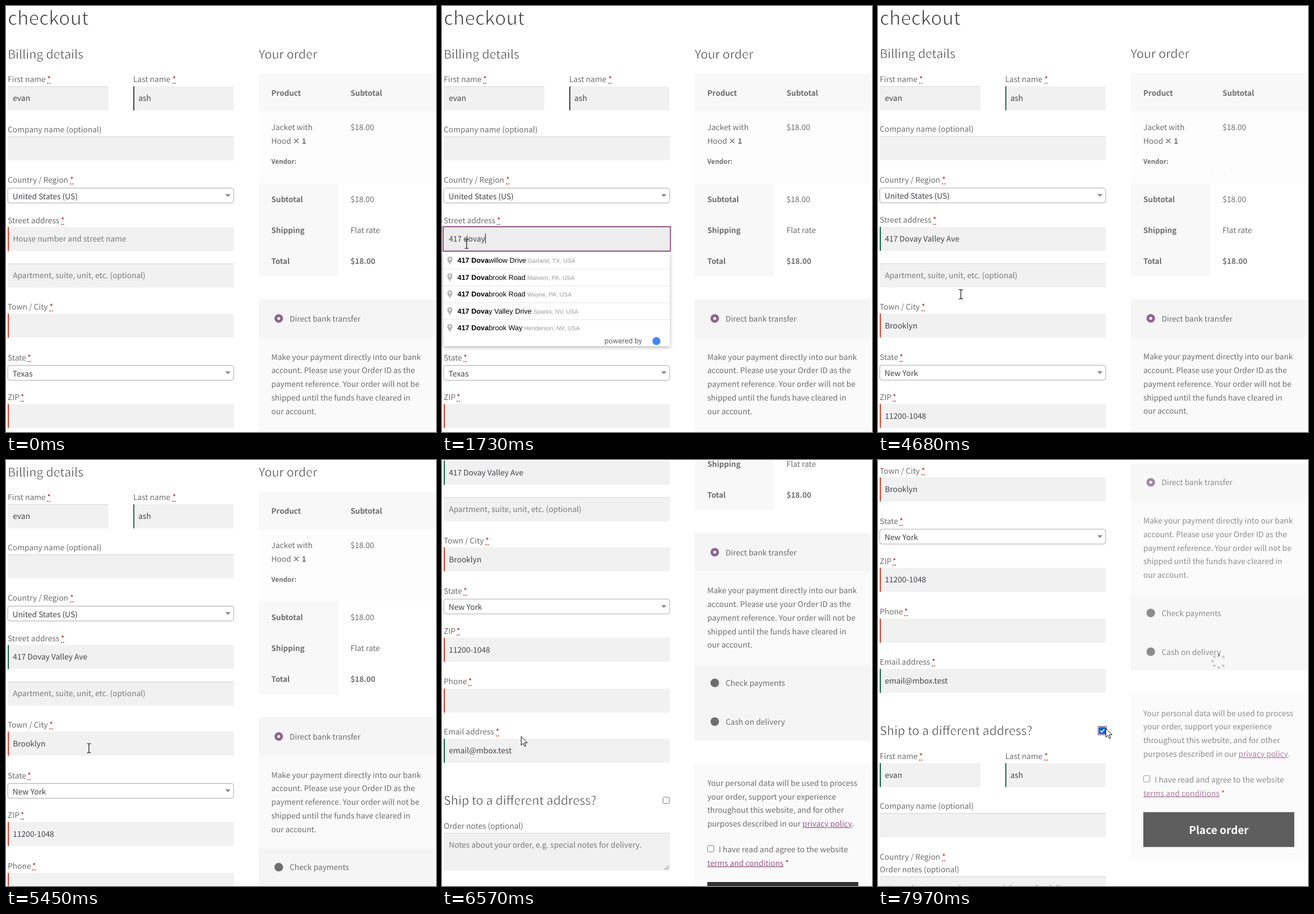
An HTML page for the animation above (8000 ms loop, 752 by 745 pixels).

```html
<!DOCTYPE html>
<html lang="en">
<head>
<meta charset="utf-8">
<title>Checkout</title>
<style>
  html, body { margin: 0; width: 100%; height: 100%; overflow: hidden; background: #fff; }
  svg { display: block; width: 100vw; height: 100vh; }
  text {
    font: 13.5px "Noto Sans CJK JP", "Noto Sans CJK SC", "Noto Sans CJK KR", "Noto Sans CJK TC", "Noto Sans CJK", sans-serif;
    fill: #6d6d6d; white-space: pre; text-rendering: geometricPrecision;
  }
  .bold { font-weight: 600; font-size: 13.2px; }
  .small { font-weight: 600; font-size: 11.4px; }
  .value { fill: #43454b; }
  .hint { fill: #7a7a7a; }
  .req { fill: #b3261e; }
  .link { fill: #96588a; text-decoration: underline; }
  .button { font-weight: 600; font-size: 18.7px; fill: #fff; text-anchor: middle; }
  .h1, .h2 { font-weight: 300; fill: #333; }
  .h1 { font-size: 34.1px; }
  .h2 { font-size: 21.9px; }
  /* Without a light face, thin the regular one. */
  .thin .h1, .thin .h2 { stroke: #fff; stroke-width: .033em; }
  .thin .h1 { font-size: 32.9px; }
  .thin .h2 { font-size: 21.1px; }
  .row { font: 12.45px "Liberation Sans", Arial, sans-serif; fill: #000; }
  .match { font-weight: 700; }
  .place { font-size: 10.4px; fill: #999; }
  .powered { font: 12.9px Roboto, sans-serif; fill: #666; }
  #list { filter: drop-shadow(0 2px 3px rgba(0,0,0,.3)); }
</style>
</head>
<body>
<svg id="stage" viewBox="0 0 752 745"></svg>
<script>
const LOOP = 8000, CLICK = 3640, CHECK = 7822, FOCUS = 140;
const RED = '#d0432c', GREEN = '#17654b', DARK = '#3a3a3a';
const QUERY = '417 dovay';
const KEYS = [350, 420, 560, 700, 910, 1050, 1190, 1400, 1610];

// Each suggestion: matched part | rest | place
const LISTS = [
  [700, ['417| Alderfen Street|Dayton, OH, USA', '417| North Pellam Road|Salem, OR, USA', '417| Brunmere Court|Tulsa, OK, USA',
         '417| West Hollin Avenue|Boise, ID, USA', '417| Kestmoor Lane|Macon, GA, USA']],
  [1120, ['417 Do|lmarrow Crossing Boulevard|Huntsville, AL, USA', '417 Do|rnfield Drive|Plano, TX, USA', '417 Do|velin Street|Akron, OH, USA',
          '417 Do|rrimore Avenue|Fresno, CA, USA', '417 Do|stwick Lane|Dover, DE, USA']],
  [1730, ['417 Dova|willow Drive|Garland, TX, USA', '417 Dova|brook Road|Malvern, PA, USA', '417 Dova|brook Road|Wayne, PA, USA',
          '417 Dova|y Valley Drive|Sparks, NV, USA', '417 Dova|brook Way|Henderson, NV, USA']],
  [2240, ['417 Dovay| Valley Drive|Sparks, NV, USA', '417 Dovay| Street|San Antonio, TX, USA', '417 Dovay| Street West|Perham, MN, USA',
          '417 Dovay| Drive|Reeds Spring, MO, USA', '417 Dovay| Valley Avenue|Brooklyn, NY, USA']],
];
const SCROLL = [[4680, 0], [4960, 63], [5600, 63], [6150, 243], [6570, 385], [6990, 507.5]];
const MOUSE_X = [[2600, 43], [3430, 127], [3900, 127], [4700, 145], [5550, 145], [5850, 138], [7000, 138], [7600, 398]];
const MOUSE_Y = [[2600, 416], [3430, 558], [3900, 558], [4700, 504], [5550, 504], [5850, 483], [7000, 483], [7600, 469]];

const rect = (x, y, w, h, fill, more = '') =>
  `<rect x="${x}" y="${y}" width="${w}" height="${h}" fill="${fill}" ${more}/>`;
const text = (x, y, s, cls = '', id = '') => `<text x="${x}" y="${y}" class="${cls}" id="${id}">${s}</text>`;
const lines = (x, y, rows) => rows.map((s, i) => text(x, y + 23.8 * i, s)).join('');

function label(x, y, s, starX) {
  const star = starX ? text(starX, y, '*', 'req') +
    `<path d="M${starX} ${y + 2.3}h6" stroke="#b3261e" stroke-width="1.4" stroke-dasharray="2 1.6"/>` : '';
  return text(x, y, s) + star;
}

function field({ y, x = 3, w = 395.5, h = 42, mark, id = '', value = '', cls = 'value' }) {
  const edge = mark ? rect(x, y, 2, h, mark, `id="${id}Mark"`) : rect(x, y, w, 1, '#d6d6d6');
  return rect(x, y, w, h, '#f1f1f1') + edge + text(x + 9, y + 25.8, value, cls, id);
}

const select = (y, value, id = '') =>
  rect(3, y, 395, 26, '#fff', 'stroke="#aaa" rx="4"') + text(11.5, y + 19, value, 'value', id) +
  `<path d="M383.5 ${y + 10.5}h9l-4.5 5z" fill="#888"/>`;

const nameBlock = (first, last, id) =>
  label(3, 133, 'First name', 72) + field({ y: 140.5, w: 176, mark: first, value: 'evan' }) +
  label(222.5, 133, 'Last name', 291) + field({ y: 140.5, x: 222.5, w: 175.5, mark: last, id, value: 'ash' }) +
  label(3, 220.7, 'Company name (optional)') + field({ y: 228 }) +
  label(3, 309, 'Country / Region', 112) + select(318.5, 'United States (US)');

const billing = () =>
  text(3, 33, 'checkout', 'h1') + text(3, 91.5, 'Billing details', 'h2') +
  nameBlock('', DARK, 'last') +
  label(3, 379.7, 'Street address', 96) + field({ y: 386.5, mark: RED, id: 'street' }) +
  field({ y: 450.5, value: 'Apartment, suite, unit, etc. (optional)', cls: 'hint' }) +
  label(3, 531, 'Town / City', 76) + field({ y: 538, mark: RED, id: 'town' }) +
  label(3, 619.5, 'State', 37.5) + select(628.5, '', 'state') +
  label(3, 689, 'ZIP', 25.5) + field({ y: 696, mark: RED, id: 'zip' }) +
  label(3, 777.5, 'Phone', 46) + field({ y: 785, mark: RED }) +
  label(3, 865.5, 'Email address', 94) + field({ y: 872.7, mark: GREEN, value: 'email@mbox.test' }) +
  text(3, 988, 'Ship to a different address?', 'h2');

const checkbox = (x, y) => rect(x, y, 11, 11, '#fff', 'stroke="#767676" rx="2"');

const shipping = () => checkbox(386.5, 975) +
  `<g id="checked">${rect(385, 973.5, 14.5, 14.5, '#fff', 'stroke="#8a6a94" stroke-width="1.4"')}
    ${rect(386.3, 974.8, 12, 12, '#0b5fd0', 'rx="1.5"')}
    <path d="M389 981l2.5 2.5 4.5-5.5" fill="none" stroke="#fff" stroke-width="1.8"/></g>
  <clipPath id="clip"><rect id="clipBox" x="0" y="1013" width="420" height="0"/></clipPath>
  <g clip-path="url(#clip)"><g transform="translate(0 897)">${nameBlock(GREEN, GREEN, '')}</g></g>
  <g id="notes">${label(3, 1030, 'Order notes (optional)')}
    ${field({ y: 1037.5, h: 66, value: 'Notes about your order, e.g. special notes for delivery.', cls: 'hint' })}
    <path d="M389 1102l8-8M393 1102l4-4" stroke="#666"/></g>`;

const summaryRow = (y, name, value, cls) => text(464, y, name, 'bold') + text(602.5, y, value, cls);
const radio = (y, name, on) =>
  `<circle cx="477" cy="${y}" r="7.5" fill="${on ? '#8d6590' : '#6d6d6d'}"/>` +
  (on ? `<circle cx="477" cy="${y}" r="2.5" fill="#fff"/>` : '') + text(496, y + 5.3, name);

const order = () =>
  text(442, 91.5, 'Your order', 'h2') +
  rect(442, 118, 308, 66.5, '#f8f8f8') + rect(442, 184.5, 308, 126, '#fdfdfd') + rect(442, 310.5, 139, 162.5, '#f8f8f8') +
  summaryRow(157, 'Product', 'Subtotal', 'bold') +
  text(464, 217, 'Jacket with') + text(464, 241, 'Hood') + text(501, 241, '× 1', 'bold') +
  text(464, 276, 'Vendor:', 'small') + text(602.5, 217, '$18.00') +
  summaryRow(343, 'Subtotal', '$18.00') + summaryRow(397, 'Shipping', 'Flat rate') + summaryRow(451.3, 'Total', '$18.00', 'bold') +
  rect(442, 513, 308, 363, '#f5f5f5') + rect(442, 580, 308, 163, '#fafafa') + rect(442, 916, 308, 289.5, '#fafafa') +
  radio(546.5, 'Direct bank transfer', true) + radio(775, 'Check payments') + radio(842.7, 'Cash on delivery') +
  lines(464, 618.5, ['Make your payment directly into our bank', 'account. Please use your Order ID as the',
    'payment reference. Your order will not be', 'shipped until the funds have cleared in', 'our account.']) +
  lines(464, 955, ['Your personal data will be used to process', 'your order, support your experience',
    'throughout this website, and for other', 'purposes described in our <tspan class="link">privacy policy</tspan>.']) +
  checkbox(464.5, 1059.5) + text(484, 1071, 'I have read and agree to the website') +
  text(464, 1095, '<tspan class="link">terms and conditions</tspan> <tspan class="req">*</tspan>') +
  rect(464, 1123.3, 264, 61, '#333') + text(596, 1161, 'Place order', 'button');

function spinner(y) {
  let dots = '';
  for (let i = 1; i < 8; i++) {
    const a = i * Math.PI / 4;
    dots += `<circle cx="${11 * Math.cos(a)}" cy="${11 * Math.sin(a)}" r="2.4" fill="#333"/>`;
  }
  return `<g transform="translate(596 ${y})"><g class="spin">${dots}</g></g>`;
}

const overlay = () => `<g id="overlay">${rect(442, 118, 308, 355, '#fff')}${rect(442, 513, 308, 692.5, '#fff')}${spinner(295)}${spinner(859.5)}</g>`;

const focusBox = () => `<g id="focus">${rect(2, 386, 397.5, 42.7, '#ededed', 'stroke="#96588a" stroke-width="2"')}
  ${text(12, 412.3, '', 'value', 'typed')}
  <path id="squiggle" d="M38 414${'l1.5-1.5l1.5 1.5'.repeat(12)}" fill="none" stroke="#e0483c"/>
  ${rect(0, 398, 1, 17, '#111', 'id="caret"')}</g>`;

const listBox = () => `<g id="list">${rect(2.5, 430.5, 396, 164.5, '#fff')}
  ${rect(2.5, 549, 396, 28.5, '#fafafa', 'id="hover"')}<g id="rows"></g>
  ${text(284, 590, 'powered by', 'powered')}<circle cx="375" cy="586" r="7" fill="#4285f4"/></g>`;

function listRow(row, i) {
  const [match, rest, place] = row.split('|'), y = 445 + 29.5 * i;
  return `<path d="M13.7 ${y + 8.5}c-.8-5-4.5-6.5-4.5-10.8a4.5 4.5 0 0 1 9 0c0 4.300-3.700 5.800-4.500 10.800z" fill="#b3b3b3"/>
    <circle cx="13.7" cy="${y - 2.500}" r="1.700" fill="#fff"/>` +
    text(27, y + 4.3, `<tspan class="match">${match}</tspan>${rest}<tspan class="place" dx="3">${place}</tspan>`, 'row') +
    (i ? rect(2.5, y - 15, 396, 1, '#e6e6e6') : '');
}

const cursors = () => `<g id="cursor">
  <path id="beam" d="M-3.500-8h2.500l1 1 1-1h2.500M0-7v14M-3.500 8h2.500l1-1 1 1h2.500" fill="none" stroke="#111" stroke-width="1.200"/>
  <path id="arrow" d="M.5.5v15.300l3.600-3.400 2.500 5.600 2.300-1-2.500-5.500h4.900z" fill="#fff" stroke="#111"/></g>`;

const stage = document.getElementById('stage');
stage.innerHTML = `<g id="page">${billing()}${shipping()}${order()}${overlay()}${focusBox()}${listBox()}</g>${cursors()}`;

const $ = id => document.getElementById(id);
const show = (id, on) => $(id).setAttribute('visibility', on ? 'visible' : 'hidden');
const move = (id, x, y) => $(id).setAttribute('transform', `translate(${x} ${y})`);
const clamp = v => Math.min(1, Math.max(0, v));
const swing = p => 0.5 - Math.cos(Math.PI * clamp(p)) / 2;
const linear = p => p;
const setText = (id, s) => { if ($(id).textContent !== s) $(id).textContent = s; };

function track(steps, t, ease) {
  const i = steps.findIndex(s => s[0] > t);
  if (i === 0) return steps[0][1];
  if (i < 0) return steps[steps.length - 1][1];
  const [t0, a] = steps[i - 1], [t1, b] = steps[i];
  return a + (b - a) * ease((t - t0) / (t1 - t0));
}

function hasLightFace() {
  const pen = document.createElement('canvas').getContext('2d');
  const family = getComputedStyle(document.querySelector('text')).fontFamily;
  const width = weight => {
    pen.font = `${weight} 100px ${family}`;
    return pen.measureText('checkout details').width;
  };
  return Math.abs(width(300) - width(400)) > 1;
}
stage.classList.toggle('thin', !hasLightFace());

let shownList = null;
function draw(t) {
  const filled = t >= CLICK, focused = t >= FOCUS && !filled;

  const pressed = KEYS.filter(k => k <= t);
  const lastKey = pressed.length ? pressed[pressed.length - 1] : FOCUS;
  setText('typed', pressed.length ? QUERY.slice(0, pressed.length) : 'House number and street name');
  $('typed').setAttribute('class', pressed.length ? 'value' : 'hint');
  $('caret').setAttribute('x', 12 + (pressed.length ? $('typed').getComputedTextLength() : 0));
  show('focus', focused);
  show('typed', focused);
  show('caret', focused && Math.floor((t - lastKey) / 530) % 2 === 0);
  show('squiggle', focused && t >= 2600);

  const list = LISTS.filter(l => l[0] <= t).pop();
  $('list').style.display = list && !filled ? '' : 'none';
  if (list && list !== shownList) {
    $('rows').innerHTML = list[1].map(listRow).join('');
    shownList = list;
  }

  setText('street', filled ? '417 Dovay Valley Ave' : 'House number and street name');
  $('street').setAttribute('class', filled ? 'value' : 'hint');
  setText('town', filled ? 'Brooklyn' : '');
  setText('state', filled ? 'New York' : 'Texas');
  setText('zip', filled ? '11200-1048' : '');
  $('streetMark').setAttribute('fill', filled ? GREEN : RED);
  $('lastMark').setAttribute('fill', filled ? GREEN : DARK);

  const fade = t < 6000 ? swing((t - 3700) / 200) - swing((t - 4400) / 300) : swing((t - 7890) / 200);
  $('overlay').setAttribute('opacity', 0.6 * fade);
  document.querySelectorAll('.spin').forEach(s => s.setAttribute('transform', `rotate(${(t - 7970) * 0.48})`));

  show('checked', t >= CHECK);
  const slide = 650 * swing((t - CHECK) / 400);
  $('clipBox').setAttribute('height', slide);
  move('notes', 0, slide);

  move('page', 0, -track(SCROLL, t, linear));
  const x = track(MOUSE_X, t, swing), y = track(MOUSE_Y, t, swing);
  const beam = t < 2700 || (t >= CLICK && t < 5600);
  move('cursor', x, y);
  show('beam', t >= 70 && beam);
  show('arrow', !beam);
  show('hover', !filled && y > 549);
}

const start = performance.now();
function tick() {
  draw((performance.now() - start) % LOOP);
  requestAnimationFrame(tick);
}
draw(0);
requestAnimationFrame(tick);
</script>
</body>
</html>
```
